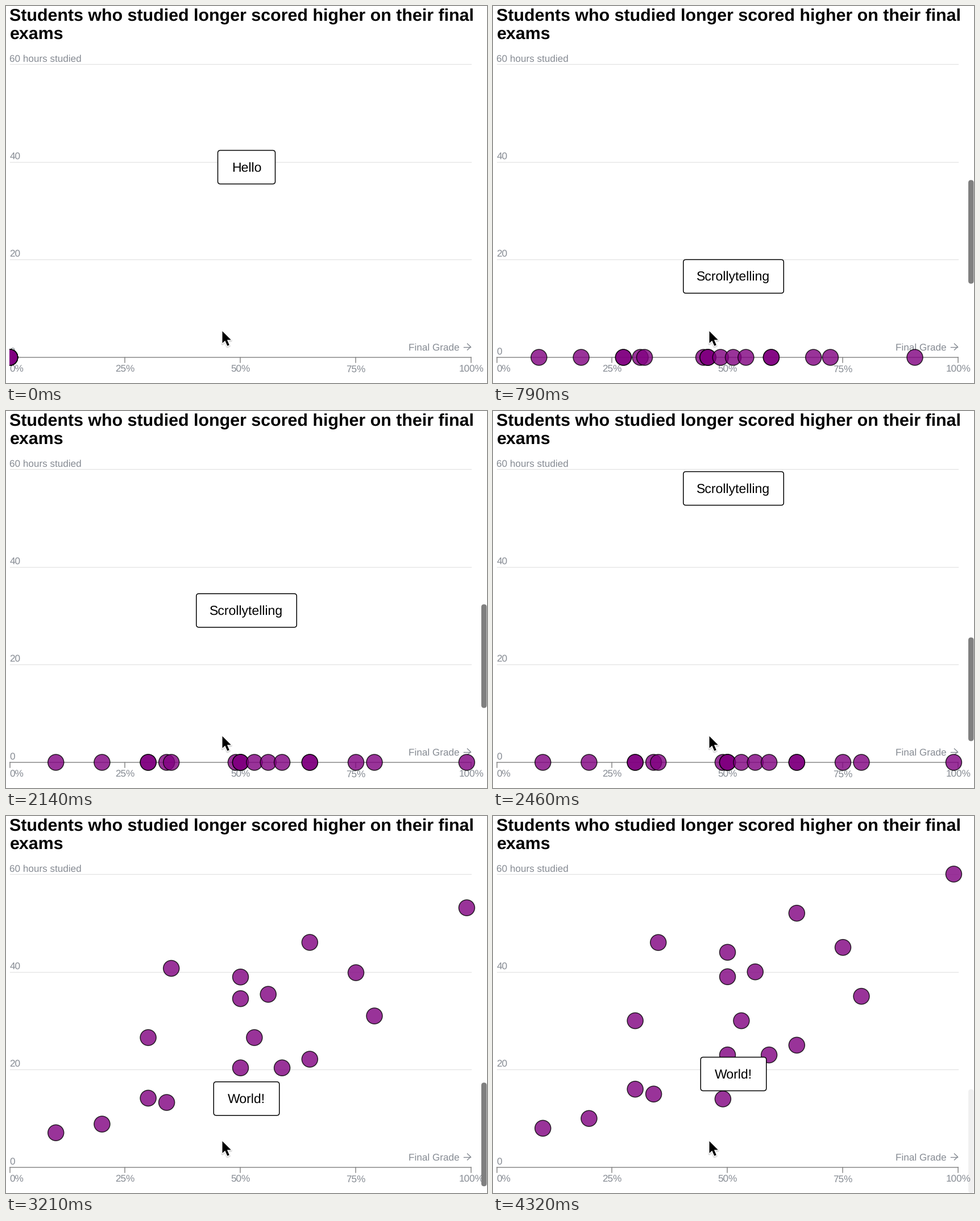
These frames come from a looping animation (846 px wide and 662 px high, 5.08 s). A matplotlib script:

```python
import numpy as np
import matplotlib.pyplot as plt
from matplotlib.animation import FuncAnimation
from matplotlib.patches import Circle, FancyBboxPatch, Polygon, Rectangle

W, H = 846, 662
LOOP, STEP = 5080, 20                     # ms
GREY, GRID, AXIS = "#868b93", "#e2e2e2", "#888888"

# the charted data: (grade in %, hours studied)
STUDENTS = [(10, 8), (20, 10), (30, 16), (30, 30), (34, 15), (35, 46),
            (49, 14), (50, 23), (50, 39), (50, 44), (53, 30), (56, 40),
            (59, 23), (65, 52), (65, 25), (75, 45), (79, 35), (99, 60)]

# cards follow each other down the page: text, box width
CARDS = [("Hello", 101), ("Scrollytelling", 176.5), ("World!", 115.5)]
CARD_H, CARD_X, CARD_GAP = 59, 423, 620
SPREAD, RISE = 443, 2877                  # when the second and third card take over
FADE, MOVE = 300, 480

# each flick of the wheel: start, distance, duration
FLICKS = [(30, 446, 950), (2030, 451, 950), (2870, 173, 680)]
PAGE_START, CARD_START = 697, 950
THUMB_RATIO, THUMB_LEN, THUMB_FADE = 0.2716, 182, 180


def px(grade):
    return 6.5 + 8.12 * grade


def py(hours):
    return 617 - 515 / 60 * hours


def ramp(t, start, length):
    return np.clip((t - start) / length, 0, 1)


def ease_out(u):
    return 1 - (1 - u)**2


def ease_in_out(u):
    return 4 * u**3 if u < 0.5 else 1 - 4 * (1 - u)**3


def scroll_at(t):
    return PAGE_START + sum(dist * ease_out(ramp(t, start, length))
                            for start, dist, length in FLICKS)


def thumb_alpha(t):
    if t > 2030:
        return max(0.1, 1 - ramp(t, 4170, THUMB_FADE))
    return 1 - ramp(t, 1600, THUMB_FADE) if t > 30 else 0


def card_alpha(i, t):
    switches = [1, ramp(t, SPREAD, FADE), ramp(t, RISE, FADE), 0]
    return 0.3 + 0.7 * (switches[i] - switches[i + 1])


plt.rcParams.update({"font.family": "Liberation Sans", "text.hinting": "none"})
fig = plt.figure(figsize=(W / 72, H / 72), dpi=72, facecolor="white")
ax = fig.add_axes([0, 0, 1, 1])
ax.set(xlim=(0, W), ylim=(H, 0))
ax.axis("off")


def label(x, y, text, size=17.1, color=GREY, z=2, **kw):
    return ax.text(x, y, text, size=size, color=color, va="baseline", zorder=z, **kw)


def line(xs, ys, color, lw=1.2):
    ax.plot(xs, ys, color=color, lw=lw, zorder=1)


def rounded(x, width, height, radius, **kw):
    return ax.add_patch(FancyBboxPatch(
        (x, 0), width, height,
        boxstyle=f"round,pad=0,rounding_size={radius}", **kw))


# title, grid and axes
label(6.5, 26.5, "Students who studied longer scored higher on their final",
      30.4, "black", weight="bold")
label(6.5, 57.5, "exams", 30.4, "black", weight="bold")

for hours in range(0, 61, 20):
    y = py(hours)
    line([px(0), px(100)], [y, y], GRID if hours else AXIS, 1.2 if hours else 1.5)
    label(6.5, y - 4.2, "60 hours studied" if hours == 60 else str(hours))

for grade in range(0, 101, 25):
    x = px(grade)
    line([x, x], [617, 625.5], AXIS, 1.5)
    label(x, 642.5, f"{grade}%", ha="center" if grade else "left")

label(798, 604.5, "Final Grade", ha="right")
line([804.5, 817], [598.5, 598.5], GREY, 1.4)
line([811.5, 817.3, 811.5], [593, 598.5, 604], GREY, 1.4)

# dots
plot_area = Rectangle((6, 0), W, H, transform=ax.transData)
dots = []
for _ in STUDENTS:
    dot = ax.add_patch(Circle((0, 0), 14, fc=(0.5, 0, 0.5, 0.8),
                              ec=(0, 0, 0, 0.8), lw=1.5, zorder=3))
    dot.set_clip_path(plot_area)
    dots.append(dot)

cards = [(rounded(CARD_X - width / 2, width, CARD_H, 4.5,
                  fc="white", ec="black", lw=1.5, zorder=5),
          label(CARD_X, 0, text, 23, "black", 6, ha="center"))
         for text, width in CARDS]

thumb = rounded(836, 9.5, THUMB_LEN, 4.7, fc="#7f7f7f", ec="none", zorder=7)

# mouse pointer
arrow = np.array([(380.5, 571), (380.5, 592), (385.3, 587.6), (389.3, 596.8),
                  (392.8, 595.3), (388.9, 586.3), (395.8, 586.3)])
for drop, color, lw, alpha in ((1.5, "black", 5, 0.08), (1.2, "black", 3, 0.12),
                               (0, "white", 3, 1), (0, "black", 0, 1)):
    ax.add_patch(Polygon(arrow + (0, drop), fc=color, ec=color, lw=lw,
                         alpha=alpha, joinstyle="round", zorder=8))


def draw(frame):
    t = (frame + 0.5) * STEP
    offset = scroll_at(t)

    across = ease_in_out(ramp(t, SPREAD, MOVE))
    up = ease_in_out(ramp(t, RISE, MOVE))
    for dot, (grade, hours) in zip(dots, STUDENTS):
        dot.center = px(grade * across), py(hours * up)

    for i, (box, text) in enumerate(cards):
        top = CARD_START + i * CARD_GAP - offset
        box.set_y(top + 0.5)
        text.set_y(top + 37.8)
        for part in (box, text):
            part.set_alpha(card_alpha(i, t))
            part.set_visible(-CARD_H - 2 < top < H)

    thumb.set_y(offset * THUMB_RATIO)
    thumb.set_alpha(thumb_alpha(t))
    return []


anim = FuncAnimation(fig, draw, frames=LOOP // STEP, interval=STEP,
                     repeat=True, repeat_delay=0)
plt.show()
```
